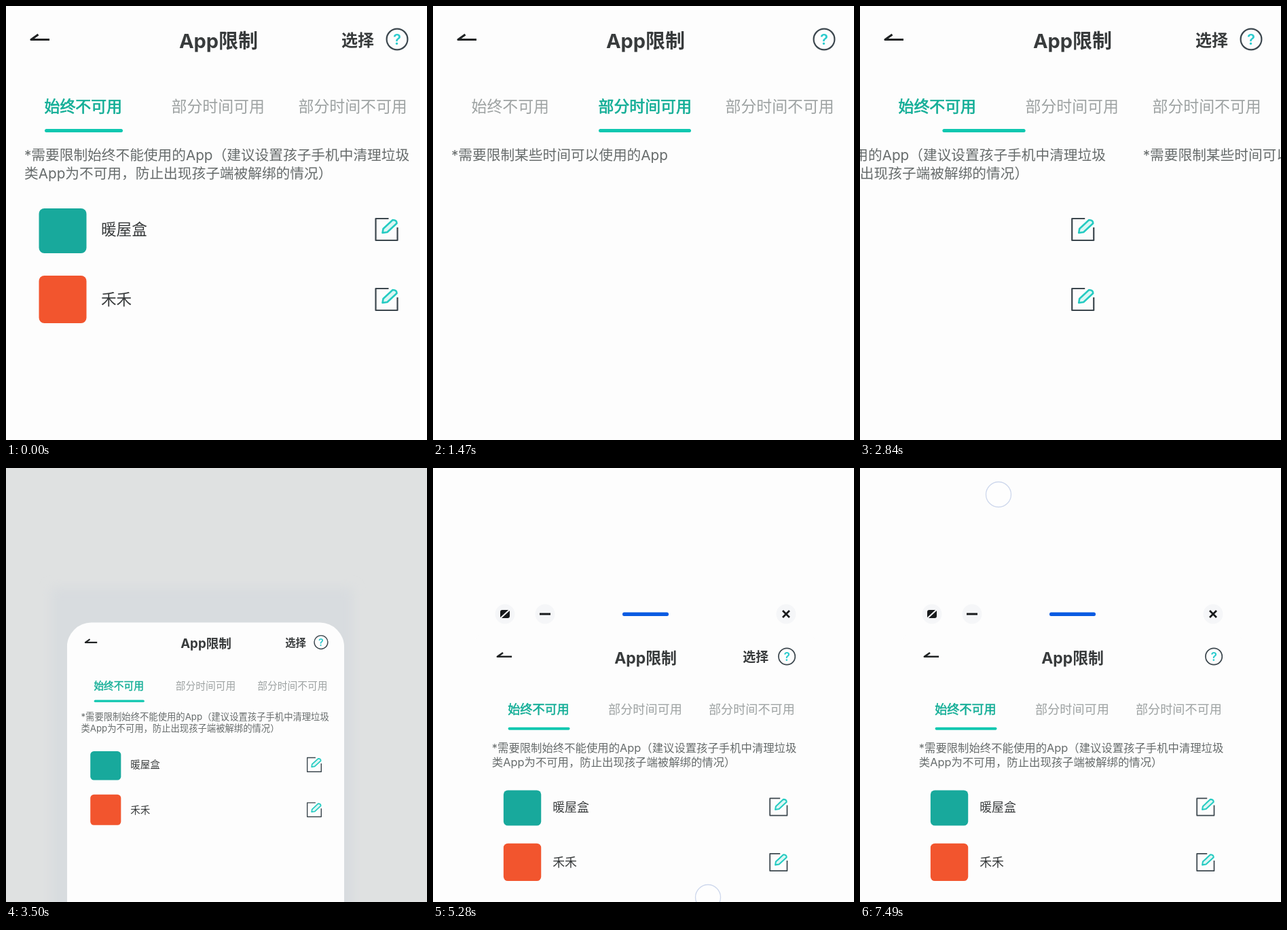
Recreate the animation shown at these times as an HTML page. Size 620 px wide and 639 px high, loop 7.51 s.

```html
<!DOCTYPE html>
<html lang="zh-CN">
<head>
<meta charset="utf-8">
<style>
html, body { margin: 0; width: 100%; height: 100%; overflow: hidden; background: #fdfdfd; }
svg { display: block; width: 620px; height: 639px; }
text { font-family: Inter, "Noto Sans CJK SC", "Noto Sans CJK", sans-serif; fill: #383b3c; white-space: pre; }
.line { fill: none; stroke: #3c474e; stroke-width: 2.2; }
.tab { stroke-width: .7; }
</style>
</head>
<body>
<svg id="stage" viewBox="0 0 620 639"></svg>
<script>
const LOOP = 7510, PAGE = 622, SETTLE = 620;
const GREEN = '#14ae97', GREY = '#9da2a2', NOTE = '#666b6b';

const text = (s, x, y, size, attrs = '') =>
  `<text x="${x}" y="${y}" dy=".37em" font-size="${size}" ${attrs}>${s}</text>`;
const icon = (x, y, h, color) =>
  `<rect x="${x}" y="${y}" width="70" height="${h}" rx="8" fill="${color}"/>`;
const edit = y => `<g transform="translate(560.5 ${y})">
  <path class="line" d="M3-16H-16V16H16V-3" stroke-linejoin="round"/>
  <path d="M-6 5L-5-1 9-14Q15-14 15-9L1 4Z" fill="#dcf7f4" stroke="#25cbc2" stroke-width="2.6" stroke-linejoin="round"/></g>`;
const note = (s, y) => text(s, 27, y, 20.7, `style="fill:${NOTE}"`);
const row = (name, y, h, color) => icon(48.5, y - 35 + (70 - h), h, color) + text(name, 140, y, 22.6) + edit(y);

const pages = [
  note('*需要限制始终不能使用的App（建议设置孩子手机中清理垃圾', 219) +
  note('类App为不可用，防止出现孩子端被解绑的情况）', 246) +
  row('暖屋盒', 329, 66, '#18a99c') + row('禾禾', 432, 70, '#f2552e'),
  note('*需要限制某些时间可以使用的App', 219),
  note('*需要限制某些时间不可使用的App', 219) +
  icon(85, 297, 70, '#15b5e5') +
  text('漫云路出行-…', 58, 394, 17.6, 'style="fill:#adb0b0"') +
  text('00:00-23:59', 213, 324, 23.4) + text('周一', 213, 381, 23) + edit(351)
];
const tabs = [
  { s: '始终不可用', x: 57, w: 115 },
  { s: '部分时间可用', x: 244, w: 136 },
  { s: '部分时间不可用', x: 431, w: 160 }
];
const button = (x, mark) => `<g transform="translate(${x} 215)"><circle r="14.5" fill="#f5f6f8"/>${mark}</g>`;

stage.innerHTML = `
<defs>
  <clipPath id="clip"><rect id="clipBox" x="-5" y="4" width="634" height="1300"/></clipPath>
  <filter id="soft"><feGaussianBlur stdDeviation="12"/></filter>
</defs>
<rect id="back" width="620" height="639"/>
<g id="card">
  <rect id="shade" x="-42" y="-76" width="691" height="1400" fill="#d8dcdf" filter="url(#soft)"/>
  <g clip-path="url(#clip)">
    <rect x="-5" y="0" width="634" height="1310" fill="#fdfdfd"/>
    <path d="M64 49.500H37L47.500 42" fill="none" stroke="#202324" stroke-width="3.200" stroke-linejoin="round"/>
    ${text('App限制', 313, 51, 29, 'font-weight="700" text-anchor="middle"')}
    ${text('选择', 494, 50, 24, 'id="pick" font-weight="700"')}
    <circle class="line" cx="576" cy="49" r="15.400"/>
    ${text('?', 576, 49, 22, 'text-anchor="middle" font-weight="600" style="fill:#2acbcd"')}
    ${tabs.map(t => text(t.s, t.x - .5, 148, 22.9, 'class="tab"')).join('')}
    <rect id="bar" y="181" height="5" rx="2.500" fill="#0fc7b0"/>
    <g id="strip">${pages.map((p, i) => `<g transform="translate(${i * PAGE})">${p}</g>`).join('')}</g>
  </g>
</g>
<g id="controls">
  ${button(106, '<path d="M-7 5V-3Q-7-6-4-6H5ZM7-5V3Q7 6 4 6H-5Z" fill="#181a1c"/>')}
  ${button(165, '<path d="M-8 0H8" stroke="#181a1c" stroke-width="3"/>')}
  <rect x="279" y="212.500" width="68" height="5.500" rx="2.500" fill="#0a5be2"/>
  ${button(520, '<path d="M-5-5L5 5M5-5L-5 5" stroke="#181a1c" stroke-width="2.800"/>')}
</g>
<circle id="touch" r="18.500" fill="#fff" fill-opacity=".4" stroke="#cdd7ec" stroke-width="1.300"/>`;

// swipe: page start, direction, underline start
const swipes = [
  [500, 1, 524], [1877, 1, 1821], [2470, -1, 2460], [2640, -1, 2630],
  [5310, 1, 5310], [5760, 1, 5750], [6420, -1, 6410], [6700, -1, 6690]
];
// touch: start, end, x from, x to, y
const touches = [
  [5290, 5480, 405, 170, 632], [5740, 5900, 420, 180, 615],
  [6400, 6560, 190, 430, 615], [6680, 6840, 190, 430, 615], [7420, 7510, 204, 204, 39]
];
// card: time, scale, x, y, corner radius, grey, controls
const poses = [
  [3290, 1, 0, 0, 0, 0, 0], [3500, .644, 93, 225, 56, 1, 0],
  [3850, .644, 93, 225, 56, 1, 0], [4350, .791, 65.5, 238.7, 20, 0, 0],
  [4500, .791, 65.5, 238.7, 20, 0, 1]
];

const clamp = u => Math.max(0, Math.min(1, u));
const easeOut = u => 1 - (1 - clamp(u)) ** 3;
const smooth = u => u * u * (3 - 2 * u);
const mix = (a, b, u) => a + (b - a) * u;
const total = f => swipes.reduce((sum, s) => sum + s[1] * f(s), 0);
const set = (el, attrs) => { for (const k in attrs) el.setAttribute(k, attrs[k]); };
const $ = id => document.getElementById(id);
const labels = document.querySelectorAll('.tab');

function poseAt(t) {
  const i = poses.findIndex(p => p[0] > t);
  if (i === 0) return poses[0];
  if (i < 0) return poses[poses.length - 1];
  const a = poses[i - 1], b = poses[i], u = smooth((t - a[0]) / (b[0] - a[0]));
  return a.map((v, k) => mix(v, b[k], u));
}

function draw(t) {
  const page = total(s => easeOut((t - s[0]) / SETTLE));
  const line = clamp(total(s => easeOut((t - s[2]) / SETTLE)) / 2) * 2;
  const chosen = total(s => t > s[0] + 110 ? 1 : 0);
  set($('strip'), { transform: `translate(${-page * PAGE})` });

  const i = Math.min(1, Math.floor(line)), u = line - i;
  set($('bar'), {
    x: mix(tabs[i].x, tabs[i + 1].x, u),
    width: mix(tabs[i].w, tabs[i + 1].w, u)
  });
  labels.forEach((el, k) => {
    el.style.fill = k === chosen ? GREEN : GREY;
    el.style.stroke = k === chosen ? GREEN : 'none';
  });
  set($('pick'), { opacity: chosen === 0 && t < 6000 ? 1 : 0 });

  const [, scale, x, y, radius, grey, controls] = poseAt(t);
  set($('card'), { transform: `translate(${x} ${y}) scale(${scale})` });
  set($('clipBox'), { rx: radius });
  set($('shade'), { opacity: grey });
  set($('back'), { fill: `rgb(${[223, 225, 225].map(c => Math.round(mix(253, c, grey)))})` });
  set($('controls'), { opacity: controls });

  const hit = touches.find(a => t >= a[0] - 60 && t < a[1]);
  set($('touch'), { opacity: hit ? 1 : 0 });
  if (hit) set($('touch'), { cx: mix(hit[2], hit[3], clamp((t - hit[0]) / (hit[1] - hit[0]))), cy: hit[4] });
}

const begin = performance.now();
function tick() {
  draw((performance.now() - begin) % LOOP);
  requestAnimationFrame(tick);
}
tick();
</script>
</body>
</html>
```
